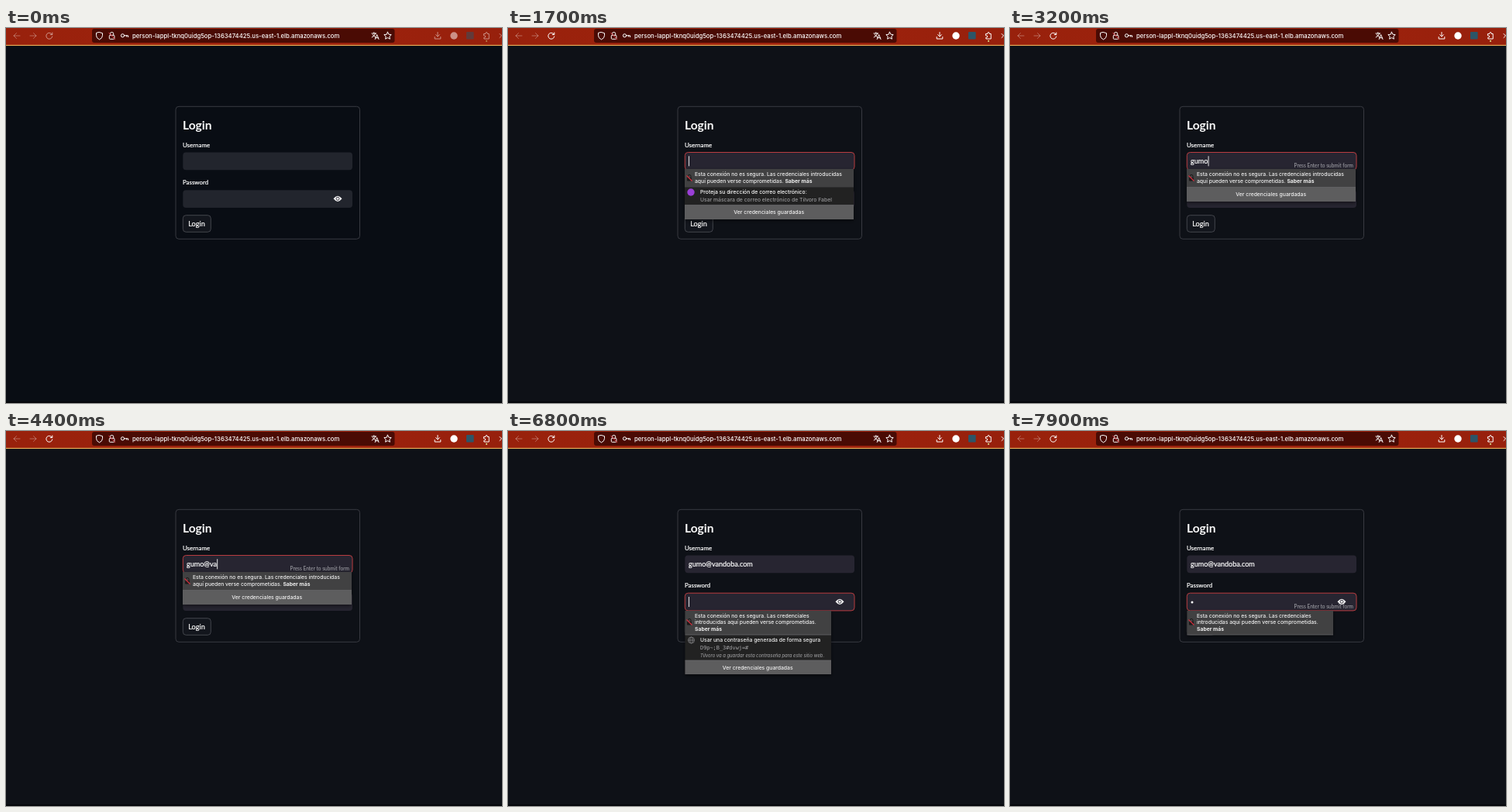
An HTML page for the animation above (8 s loop, 640 by 484 pixels).

```html
<!DOCTYPE html>
<html lang="es">
<head>
<meta charset="utf-8">
<title>Login</title>
<style>
  html, body { margin: 0; width: 100%; height: 100%; overflow: hidden; background: #0e1117; }
  svg { display: block; width: 100%; height: 100%; }
  text { white-space: pre; }
  .app { font-family: Lato, "Open Sans", sans-serif; fill: #fafafa; }
  .app text { stroke: #fafafa; stroke-width: .22; }
  .ui { font-family: Inter, Roboto, sans-serif; fill: #f2f2f2; font-size: 6.8px; font-weight: 500; }
  .icon { fill: none; stroke: #fff; stroke-width: 1; stroke-linecap: round; stroke-linejoin: round; }
  .app .hint { font-size: 6.55px; fill: #a8a8ae; stroke: none; text-anchor: end; }
  .bold { font-weight: 700; }
  .app .bold { stroke: none; }
  .mid { text-anchor: middle; }
</style>
</head>
<body>
<svg viewBox="0 0 640 484" preserveAspectRatio="none">
  <defs>
    <linearGradient id="chrome">
      <stop offset="0" stop-color="#98210c"/>
      <stop offset=".5" stop-color="#a0230d"/>
      <stop offset="1" stop-color="#97200c"/>
    </linearGradient>
    <filter id="shadow" x="-10%" y="-20%" width="120%" height="150%">
      <feDropShadow dx="0" dy="2" stdDeviation="2.5" flood-color="#000" flood-opacity=".5"/>
    </filter>
    <g id="insecure" fill="none">
      <path d="M-2-1v-1.600a2 2 0 0 1 4 0V-1" stroke="#1c1a1a"/>
      <rect x="-3" y="-1" width="6" height="4.600" rx="1" fill="#1c1a1a"/>
      <path d="M-3.500-3.500 3.500 3.500" stroke="#d0303f" stroke-width="1.300"/>
    </g>
  </defs>

  <rect id="page" width="640" height="484"/>
  <rect width="640" height="22" fill="url(#chrome)"/>
  <rect y="21.800" width="640" height="1.200" fill="#e2a956"/>
  <rect y="482" width="640" height="2" fill="#05070b"/>

  <g class="icon">
    <g opacity=".32">
      <path d="M18 10h-8m3.500-3.500L10 10l3.500 3.500M31 10h8m-3.500-3.500L39 10l-3.500 3.500"/>
    </g>
    <path class="live" d="M59.200 8A4 4 0 1 0 59.800 11M59.800 6v2.600h-2.600"/>
    <rect x="111" y="1" width="390.500" height="18" rx="3" fill="#4a0b04" stroke="none"/>
    <path d="M120.500 5.500l4 1.200v3q0 3.400-4 5.200q-4-1.800-4-5.200v-3z"/>
    <rect x="133.300" y="9.300" width="6.600" height="5" rx="1"/>
    <path d="M134.500 9V7.500a2.100 2.100 0 0 1 4.200 0V9"/>
    <path d="M132.800 6.200l7.800 8.300" stroke="#e0404a"/>
    <circle cx="150.500" cy="9.800" r="2.100"/>
    <path d="M152.600 9.800h5v1.800m-2-1.800v1.300"/>
    <path d="M472 7h5.600M474.800 5.700V7m2 0q-1 3.400-4.600 5M473.300 8.600q1.200 2.200 3 3M476.200 14.500l2.400-6 2.400 6m-4-1.800h3.200"/>
    <path d="M492.500 5.200l1.400 3 3.300.4-2.400 2.300.6 3.300-2.900-1.600-2.900 1.600.6-3.300-2.400-2.300 3.300-.4z"/>
    <g class="live">
      <path d="M557 5.500v5.500m-2.400-2.300L557 11l2.400-2.300M553.200 11.500V14h7.600v-2.500"/>
      <circle cx="578" cy="10" r="4.700" fill="#fff" stroke="none"/>
      <rect x="594" y="5" width="9.600" height="9.600" rx="1" fill="#2c5568" stroke="none"/>
      <path d="M616.800 7.500h2V6.800a1.200 1.200 0 0 1 2.400 0v.7h2v6.500h-6.400v-1.800h.7a1.200 1.200 0 0 0 0-2.400h-.7z"/>
      <circle cx="620" cy="16.800" r="1.100" fill="#d8e08a" stroke="none"/>
      <path d="M637 7.500l2.500 2.500-2.500 2.500"/>
    </g>
  </g>
  <text class="ui" x="163" y="12.900" style="font-size:7.72px;fill:#fff">person-lappl-tknq0uidg5op-1363474425.us-east-1.elb.amazonaws.com</text>

  <g class="app">
    <rect x="219" y="101.300" width="237.500" height="171" rx="4" fill="none" stroke="#383a41"/>
    <text class="bold" x="228" y="130.800" font-size="15.600">Login</text>
    <text x="228" y="153.600" font-size="7.900">Username</text>
    <text x="228" y="202.400" font-size="7.900">Password</text>
    <rect id="userBox" x="228.300" y="160.500" width="218.700" height="22.700" rx="4"/>
    <rect id="passBox" x="228.300" y="209.200" width="218.700" height="22.700" rx="4"/>
    <text id="user" x="233" y="175" font-size="9.050"></text>
    <circle id="dot" cx="235" cy="221" r="1.500"/>
    <path d="M422.500 220.300q5.500-7.200 11 0q-5.500 7.200-11 0z"/>
    <circle cx="428" cy="220.300" r="2" fill="none" stroke="#262430" stroke-width=".9"/>
    <text id="userHint" class="hint" x="443" y="180.200">Press Enter to submit form</text>
    <text id="passHint" class="hint" x="443" y="229">Press Enter to submit form</text>
    <rect id="caret" width=".9" height="13"/>
    <rect x="228.300" y="241.700" width="36" height="21.600" rx="4" fill="#13161d" stroke="#43454c"/>
    <text x="235.200" y="255.800" font-size="9.150">Login</text>
  </g>

  <g id="userMenu" class="ui">
    <g filter="url(#shadow)">
      <rect id="userPanel" x="228" y="182" width="218" fill="#232324"/>
    </g>
    <rect x="228" y="182" width="218" height="23.500" fill="#414142"/>
    <use href="#insecure" x="234" y="194"/>
    <text x="241" y="191.300">Esta conexión no es segura. Las credenciales introducidas</text>
    <text x="241" y="200.100">aquí pueden verse comprometidas. <tspan class="bold">Saber más</tspan></text>
    <g id="mask">
      <circle cx="236" cy="212" r="4.700" fill="#9a3fd6"/>
      <text x="248" y="214.300" fill="#fff">Proteja su dirección de correo electrónico:</text>
      <text x="248" y="224" style="fill:#98989a">Usar máscara de correo electrónico de Tilvoro Fabel</text>
    </g>
    <g id="userFoot">
      <rect x="228" width="218" height="18.500" fill="#5d5d5e"/>
      <path d="M228 0h218" stroke="#717172" stroke-width=".6"/>
      <text class="mid" x="336.700" y="11.300">Ver credenciales guardadas</text>
    </g>
  </g>

  <g id="passMenu" class="ui">
    <g filter="url(#shadow)">
      <rect id="passPanel" x="228.500" y="232" width="188.500" fill="#232324"/>
    </g>
    <rect x="228.500" y="232" width="188.500" height="31" fill="#414142"/>
    <path d="M228.500 263h188.500" stroke="#666667" stroke-width=".8"/>
    <use href="#insecure" x="234" y="247"/>
    <text x="241" y="240.800">Esta conexión no es segura. Las credenciales</text>
    <text x="241" y="249.400">introducidas aquí pueden verse comprometidas.</text>
    <text class="bold" x="241" y="258">Saber más</text>
    <g id="suggest">
      <g fill="none" stroke="#858587" stroke-width=".8">
        <circle cx="236.500" cy="270" r="4"/>
        <ellipse cx="236.500" cy="270" rx="1.700" ry="4"/>
        <path d="M232.500 270h8"/>
      </g>
      <text x="248" y="272.200">Usar una contraseña generada de forma segura</text>
      <text x="248" y="282" style="font:6.9px 'DejaVu Sans Mono',monospace;fill:#a5a5a7">D9p~;B_3#dvwj=#</text>
      <text x="248" y="291.600" style="font-size:5.85px;font-style:italic;fill:#98989a">Tilvoro va a guardar esta contraseña para este sitio web.</text>
      <rect x="228.500" y="296" width="188.500" height="18" fill="#5d5d5e"/>
      <path d="M228.500 296h188.500" stroke="#717172" stroke-width=".6"/>
      <text class="mid" x="322.200" y="307.500">Ver credenciales guardadas</text>
    </g>
  </g>
</svg>
<script>
const LOOP = 8000;
const EMAIL = "gumo@vandoba.com";
// The time at which each letter of the address is typed.
const KEYS = [2600, 2800, 3000, 3200, 3700, 4100, 4400, 4600, 4800, 5000, 5200, 5400, 5700, 6200, 6300, 6400];
const SLIP = [5900, 6200];
const FOCUS_USER = 1400, MENU_USER = 1600, FOCUS_PASS = 6600, MENU_PASS = 6700, TYPE_PASS = 7800;

const $ = id => document.getElementById(id);
const live = document.querySelectorAll(".live");
const within = (t, a, b) => t >= a && t < b;
const show = (id, on) => $(id).setAttribute("display", on ? "inline" : "none");
const set = (id, attrs) => { for (const k in attrs) $(id).setAttribute(k, attrs[k]); };
const mix = (a, b, k) => `rgb(${a.map((v, i) => Math.round(v + (b[i] - v) * k))})`;

function render(t) {
  // The window gains focus.
  const wake = Math.min(1, Math.max(0, (t - 500) / 200));
  live.forEach(el => el.setAttribute("opacity", 0.5 + 0.5 * wake));
  set("page", { fill: mix([9, 13, 20], [14, 17, 23], wake) });
  const field = mix([34, 37, 45], [39, 37, 49], wake);
  const ring = on => on ? "#b83c40" : "none";
  set("userBox", { fill: field, stroke: ring(within(t, MENU_USER, FOCUS_PASS)) });
  set("passBox", { fill: field, stroke: ring(t >= FOCUS_PASS) });

  const typed = KEYS.filter(k => k <= t).length;
  const slip = within(t, ...SLIP);
  $("user").textContent = EMAIL.slice(0, typed) + (slip ? "-" : "");
  show("userHint", within(t, KEYS[0], FOCUS_PASS));
  show("passHint", t >= TYPE_PASS);
  show("dot", t >= TYPE_PASS);

  const inPass = t >= FOCUS_PASS;
  const since = t - (inPass ? FOCUS_PASS : typed ? KEYS[typed - 1] : FOCUS_USER);
  show("caret", t >= FOCUS_USER && t < TYPE_PASS && !slip && since % 1000 < 500);
  set("caret", {
    x: 233 + (inPass || !typed ? 0 : $("user").getComputedTextLength() + 0.3),
    y: inPass ? 214 : 165.3
  });

  const full = t < 2700;
  show("userMenu", within(t, MENU_USER, FOCUS_PASS));
  show("mask", full);
  set("userPanel", { height: full ? 65 : 42 });
  set("userFoot", { transform: `translate(0 ${full ? 228.5 : 205.5})` });

  const offer = t < 7900;
  show("passMenu", t >= MENU_PASS);
  show("suggest", offer);
  set("passPanel", { height: offer ? 82 : 31 });
}

const start = performance.now();
function tick() {
  render((performance.now() - start) % LOOP);
  requestAnimationFrame(tick);
}
tick();
</script>
</body>
</html>
```
